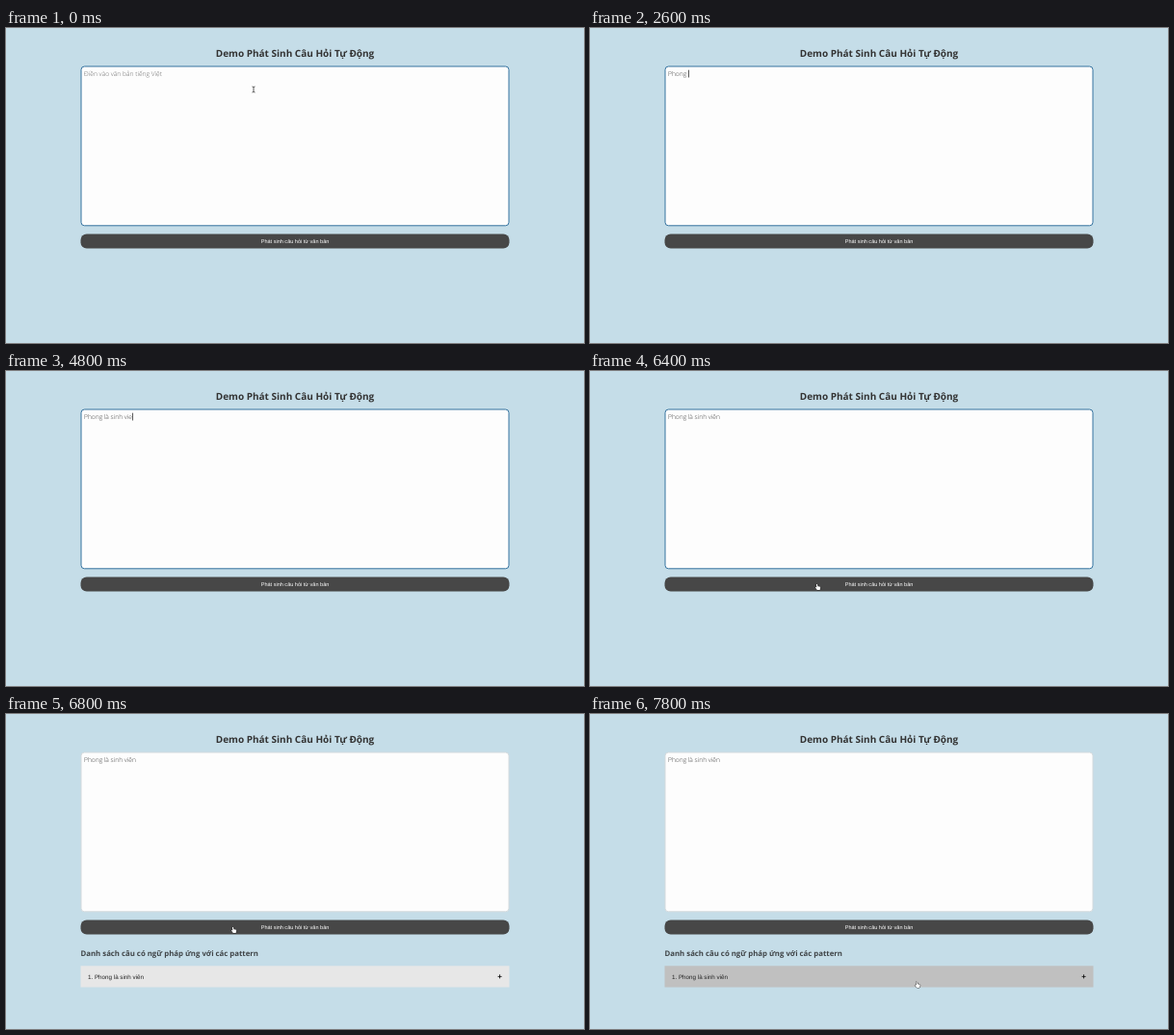
Write an HTML page with a canvas that moves like this. It is 600 by 328 pixels and loops after 8 s.

```html
<!DOCTYPE html>
<html lang="vi">
<head>
<meta charset="utf-8">
<title>Demo Phát Sinh Câu Hỏi Tự Động</title>
<style>
html, body { margin: 0; width: 100%; height: 100%; overflow: hidden; background: #c5dde8; }
canvas { display: block; width: 600px; height: 328px; }
</style>
</head>
<body>
<canvas id="stage"></canvas>
<script>
const W = 600, H = 328, LOOP = 8000, STEP = 200;
const canvas = document.getElementById('stage');
const ctx = canvas.getContext('2d');
const ratio = window.devicePixelRatio || 1;
canvas.width = W * ratio;
canvas.height = H * ratio;
ctx.scale(ratio, ratio);
ctx.textRendering = 'geometricPrecision';

const OPEN = '"Open Sans", sans-serif';
const ARIAL = '"Liberation Sans", Arial, sans-serif';
const INPUT_FONT = `300 6.67px ${OPEN}`;
const SENTENCE = 'Phong là sinh viên';

// [time, typed text]
const typing = [
  [0, ''], [1400, 'P'], [2000, 'Ph'], [2200, 'Pho'], [2400, 'Phong'],
  [2600, 'Phong '], [2800, 'Phong l'], [3000, 'Phong là'], [3200, 'Phong là '],
  [3400, 'Phong là s'], [3600, 'Phong là sin'], [3800, 'Phong là sinh '],
  [4200, 'Phong là sinh v'], [4400, 'Phong là sinh vi'],
  [4800, 'Phong là sinh vie'], [5000, SENTENCE]
];

// [time, visible]
const caret = [
  [0, false], [200, true], [600, false], [1000, true],
  [5400, false], [6000, true], [6400, false]
];

// [time, kind, x, y]
const pointer = [
  [0, 'beam', 257, 64], [1400, 'none', 0, 0], [5800, 'beam', 255, 82],
  [6000, 'beam', 246, 158], [6200, 'hand', 238, 219], [6400, 'hand', 236.5, 225],
  [7400, 'hand', 262, 227], [7600, 'hand', 322, 270], [7800, 'hand', 340, 282]
];

function at(track, t) {
  let found = track[0];
  for (const entry of track) if (entry[0] <= t) found = entry;
  return found;
}

function text(str, x, y, font, color, align = 'left') {
  ctx.font = font;
  ctx.fillStyle = color;
  ctx.textAlign = align;
  ctx.fillText(str, x, y);
}

function box(x, y, w, h, r, fill, stroke) {
  ctx.beginPath();
  ctx.roundRect(x, y, w, h, r);
  ctx.fillStyle = fill;
  ctx.fill();
  if (!stroke) return;
  ctx.strokeStyle = stroke;
  ctx.lineWidth = 1;
  ctx.stroke();
}

function drawBeam(x, y) {
  ctx.beginPath();
  ctx.moveTo(x - 1.5, y - 3);
  ctx.quadraticCurveTo(x, y - 3, x, y - 2);
  ctx.lineTo(x, y + 2);
  ctx.quadraticCurveTo(x, y + 3, x - 1.5, y + 3);
  ctx.moveTo(x + 1.5, y - 3);
  ctx.quadraticCurveTo(x, y - 3, x, y - 2);
  ctx.moveTo(x, y + 2);
  ctx.quadraticCurveTo(x, y + 3, x + 1.5, y + 3);
  ctx.strokeStyle = '#333';
  ctx.lineWidth = 0.8;
  ctx.stroke();
}

function drawHand(x, y) {
  ctx.save();
  ctx.translate(x, y);
  ctx.beginPath();
  ctx.moveTo(-1.6, -2.8);
  ctx.quadraticCurveTo(-0.9, -3.6, -0.4, -2.6);
  ctx.lineTo(0, -0.8);
  ctx.lineTo(2, -0.5);
  ctx.quadraticCurveTo(2.9, -0.2, 2.7, 1);
  ctx.lineTo(2.1, 2.9);
  ctx.lineTo(-0.7, 2.9);
  ctx.lineTo(-2.6, 0.6);
  ctx.quadraticCurveTo(-2.5, -0.3, -1.1, 0.4);
  ctx.closePath();
  ctx.strokeStyle = '#222';
  ctx.lineWidth = 1;
  ctx.lineJoin = 'round';
  ctx.stroke();
  ctx.fillStyle = '#fff';
  ctx.fill();
  ctx.restore();
}

function drawInput(t) {
  const focused = t < 6600;
  box(78, 40, 444, 165.8, 3.5, '#fdfdfd', focused ? '#34729f' : '#d3dadd');
  const typed = at(typing, t)[1];
  if (typed) text(typed, 81, 50.2, INPUT_FONT, '#3c3c3c');
  else text('Điền vào văn bản tiếng Việt', 81, 50.2, INPUT_FONT, '#666');
  if (at(caret, t)[1]) {
    ctx.font = INPUT_FONT;
    ctx.fillStyle = '#333';
    ctx.fillRect(81.2 + ctx.measureText(typed).width, 43.7, 0.8, 7.8);
  }
}

function drawButton(t) {
  const pressed = t >= 6600 && t < 6800;
  box(77.5, 214.5, 445, 15, 6.2, pressed ? '#5e5e5e' : '#474747');
  text('Phát sinh câu hỏi từ văn bản', 300, 223.9, `5.56px ${ARIAL}`, '#fff', 'center');
}

function drawResult(t) {
  text('Danh sách câu có ngữ pháp ứng với các pattern', 77.5, 252.2, `bold 7.8px ${OPEN}`, '#3f4447');
  const fill = t < 7600 ? '#e7e7e7' : t < 7800 ? '#d2d2d2' : '#c0c0c0';
  box(77.5, 262.2, 445, 22.3, 0, fill);
  text('1. ' + SENTENCE, 85, 275.6, `6.25px ${ARIAL}`, '#222');
  text('+', 515, 276, `bold 8px ${ARIAL}`, '#111', 'right');
}

function draw(t) {
  ctx.fillStyle = '#c5dde8';
  ctx.fillRect(0, 0, W, H);
  text('Demo Phát Sinh Câu Hỏi Tự Động', 300, 30, `bold 10px ${OPEN}`, '#333', 'center');
  drawInput(t);
  drawButton(t);
  if (t >= 6800) drawResult(t);
  const [, kind, x, y] = at(pointer, t);
  if (kind === 'beam') drawBeam(x, y);
  if (kind === 'hand') drawHand(x, y);
}

const start = performance.now();
function tick() {
  const t = (performance.now() - start) % LOOP;
  draw(Math.floor(t / STEP) * STEP);
  requestAnimationFrame(tick);
}
tick();
</script>
</body>
</html>
```
